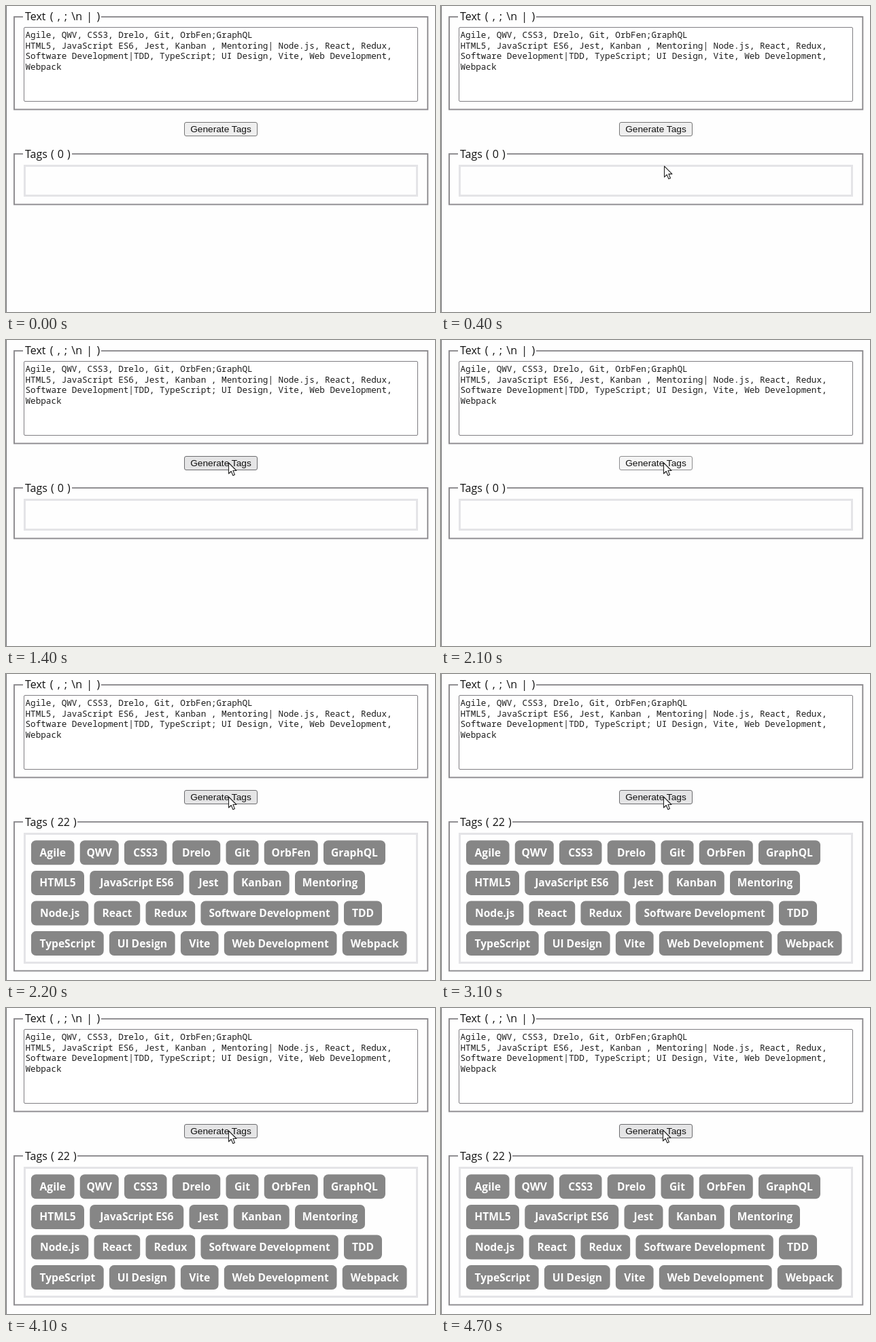
Animation of 631x451 px, one loop 4900 ms. Source, as an HTML page:

```html
<!DOCTYPE html>
<html lang="en">
<head>
<meta charset="utf-8">
<title>Tag generator</title>
<style>
  html, body { margin: 0; width: 100%; height: 100%; overflow: hidden; background: #fefefe; }
  svg { display: block; width: 631px; height: 451px; }
  .frame { fill: none; stroke: #8c8a8e; stroke-width: 1.9; }
  .gap { fill: #fefefe; }
  .legend { font: 16px "Open Sans", sans-serif; fill: #111; }
  .area { fill: #fff; stroke: #807e83; }
  .code { font: 12.67px "Noto Sans Mono", monospace; fill: #1c1c1c; white-space: pre; }
  .box { fill: none; stroke: #e4e4e7; stroke-width: 3; }
  .button { fill: #efefef; stroke: #767676; }
  .button.hover { fill: #e5e5e6; stroke: #6c6c6f; }
  .button.down { fill: #f5f5f5; stroke: #8d8d8f; }
  .caption { font: 13.7px "Liberation Sans", Arial, sans-serif; fill: #111; text-anchor: middle; }
  .pill { fill: #868686; }
  .tag { font: bold 15.6px "Open Sans", sans-serif; fill: #fff; text-anchor: middle; }
  .arrow { fill: #fff; stroke: #222; stroke-width: 1.1; stroke-linejoin: round; }
</style>
</head>
<body>
<svg viewBox="0 0 631 451">
  <rect width="1" height="451" fill="#747476"/>

  <rect class="frame" x="12" y="16" width="608.3" height="136.5"/>
  <rect class="gap" x="25" y="8" width="115" height="16"/>
  <text class="legend" x="28" y="21" word-spacing="2.1">Text ( , ; \n | )</text>
  <rect class="area" x="26.5" y="31.5" width="579" height="109" rx="1.5"/>
  <g id="lines"></g>

  <rect class="button" id="button" x="262.5" y="171.5" width="107" height="20" rx="2.5"/>
  <text class="caption" x="316" y="186">Generate Tags</text>

  <rect class="frame" id="tagFrame" x="12" y="218" width="608.3"/>
  <rect class="gap" id="tagGap" x="25" y="210" height="16"/>
  <text class="legend" id="count" x="28" y="223.7" word-spacing="0.9"></text>
  <rect class="box" id="tagBox" x="27.5" y="235.5" width="577"/>
  <g id="tags"></g>

  <path class="arrow" id="arrow" d="M.5 .5V16.5L4.2 13L6.9 19.2L9.5 18.1L6.9 12H11.9Z"/>
</svg>
<script>
const LOOP = 4900, STEP = 100, GAP = 8.25;
const el = id => document.getElementById(id);

function add(parent, name, attrs, text) {
  const node = document.createElementNS("http://www.w3.org/2000/svg", name);
  for (const key in attrs) node.setAttribute(key, attrs[key]);
  if (text) node.textContent = text;
  parent.append(node);
}

const lines = [
  "Agile, QWV, CSS3, Drelo, Git, OrbFen;GraphQL",
  "HTML5, JavaScript ES6, Jest, Kanban , Mentoring| Node.js, React, Redux,",
  "Software Development|TDD, TypeScript; UI Design, Vite, Web Development,",
  "Webpack"
];
lines.forEach((line, i) =>
  add(el("lines"), "text", { class: "code", x: 28.5, y: 47.2 + i * 15.6 }, line));

// Each row: tag name and pill width.
const rows = [
  [["Agile", 63.5], ["QWV", 57], ["CSS3", 62.5], ["Drelo", 70.5], ["Git", 48], ["OrbFen", 79], ["GraphQL", 91]],
  [["HTML5", 78], ["JavaScript ES6", 138], ["Jest", 57], ["Kanban", 82], ["Mentoring", 103]],
  [["Node.js", 84.3], ["React", 67.7], ["Redux", 72.7], ["Software Development", 202.3], ["TDD", 56]],
  [["TypeScript", 106.7], ["UI Design", 96.7], ["Vite", 55.7], ["Web Development", 165.7], ["Webpack", 94.8]]
];
rows.forEach((row, i) => {
  const y = 245.3 + i * 44.6;
  let x = 37;
  for (const [name, width] of row) {
    add(el("tags"), "rect", { class: "pill", x, y, width, height: 36, rx: 7 });
    add(el("tags"), "text", { class: "tag", x: x + width / 2, y: y + 23.4 }, name);
    x += width + GAP;
  }
});

// Pointer stops: time, x, y
const path = [
  [100, 331, 383], [700, 327, 186.5], [900, 327, 180.5],
  [4500, 327, 180.5], [4600, 326, 179.5], [LOOP, 326, 179.5]
];

function pointerAt(t) {
  const i = path.findIndex(stop => t < stop[0]);
  const [t0, x0, y0] = path[i - 1], [t1, x1, y1] = path[i];
  const p = 1 - (1 - (t - t0) / (t1 - t0)) ** 2;
  return [x0 + (x1 - x0) * p, y0 + (y1 - y0) * p];
}

function draw(time) {
  const t = Math.floor(time % LOOP / STEP) * STEP;
  const done = t >= 2200;
  const visible = t >= 100;
  let over = false;
  if (visible) {
    const [x, y] = pointerAt(t);
    over = y < 192;
    el("arrow").setAttribute("transform", `translate(${x} ${y})`);
  }
  el("arrow").style.display = visible ? "" : "none";
  const down = t >= 2100 && t < 2200;
  el("button").setAttribute("class", "button" + (down ? " down" : over ? " hover" : ""));
  el("tagFrame").setAttribute("height", done ? 219.5 : 74.5);
  el("tagBox").setAttribute("height", done ? 190 : 44);
  el("tagGap").setAttribute("width", done ? 80 : 72);
  el("count").textContent = `Tags ( ${done ? 22 : 0} )`;
  el("tags").style.display = done ? "" : "none";
}

const start = performance.now();
function tick() {
  draw(performance.now() - start);
  requestAnimationFrame(tick);
}
tick();
</script>
</body>
</html>
```
